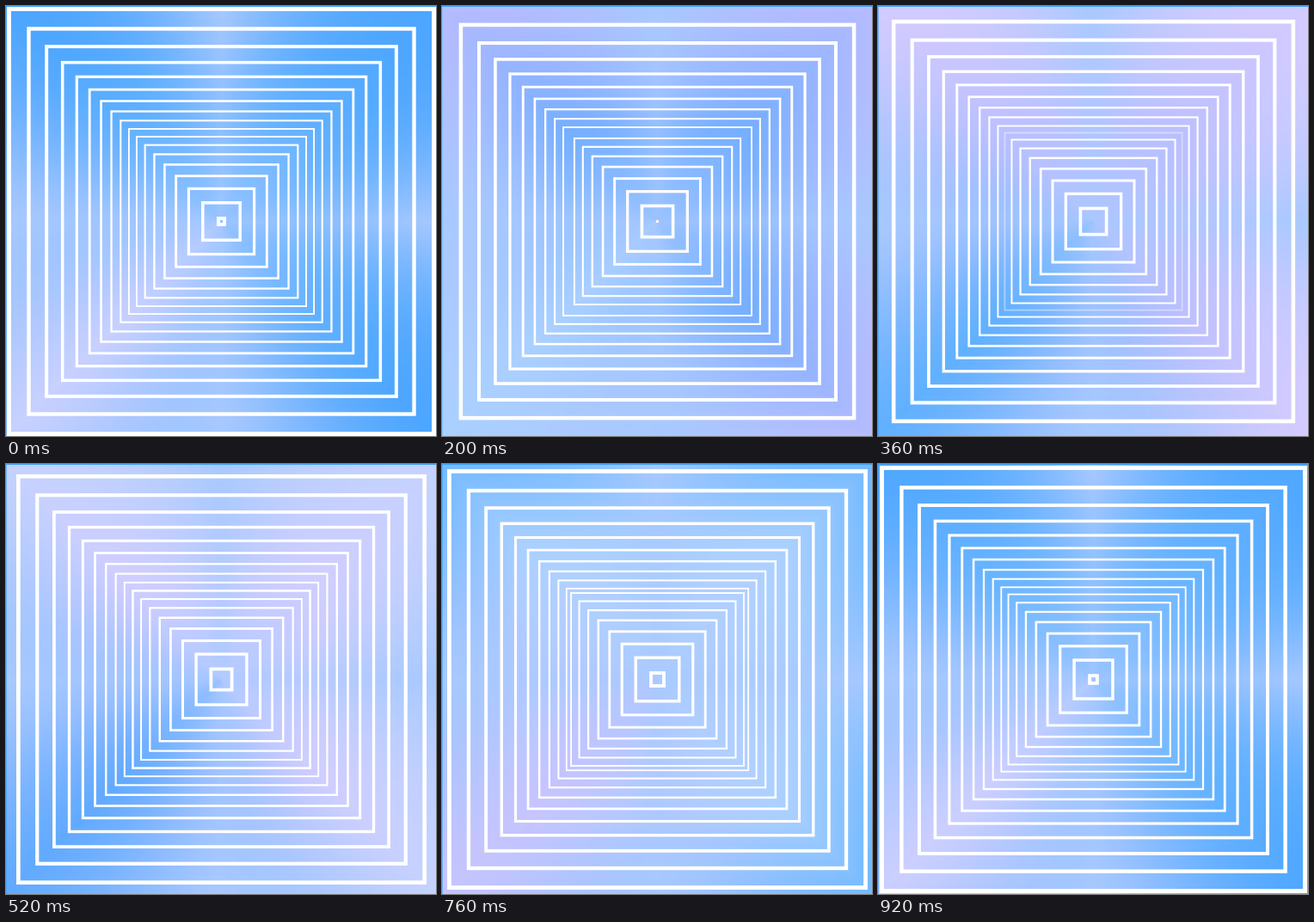
An HTML page with a canvas that plays this animation: 500 px wide and 500 px high, repeating every 960 ms.

```html
<!DOCTYPE html>
<html lang="en">
<head>
<meta charset="utf-8">
<title>Square tunnel</title>
<style>
html, body { margin: 0; width: 100%; height: 100%; overflow: hidden; }
canvas { display: block; width: 500px; height: 500px; }
</style>
</head>
<body>
<canvas id="stage" width="500" height="500"></canvas>
<script>
const LOOP = 960, STEP = 40, CENTER = 250.5, GRID = 100;
const MEAN = [168, 201];
// Corner colour cycle: time, red, green (blue stays at 255)
const CYCLE = [
  [0, 77, 166], [200, 183, 188], [360, 212, 204], [520, 196, 210],
  [680, 170, 208], [760, 116, 186], [920, 78, 167], [960, 77, 166]
];

const ctx = document.getElementById('stage').getContext('2d');
const field = document.createElement('canvas');
field.width = field.height = GRID;
const fieldCtx = field.getContext('2d');
const image = fieldCtx.createImageData(GRID, GRID);

const clamp = x => Math.max(0, Math.min(1, x));
const mix = (a, b, k) => a + (b - a) * k;

function cycleColor(time) {
  const t = ((time % LOOP) + LOOP) % LOOP;
  const i = CYCLE.findIndex(key => key[0] > t);
  const a = CYCLE[i - 1], b = CYCLE[i];
  const k = (t - a[0]) / (b[0] - a[0]);
  return [mix(a[1], b[1], k), mix(a[2], b[2], k)];
}

function drawField(t) {
  for (let y = 0, p = 0; y < GRID; y++) {
    for (let x = 0; x < GRID; x++, p += 4) {
      const dx = (x + 0.5) / GRID * 2 - 1, dy = (y + 0.5) / GRID * 2 - 1;
      const radius = Math.max(Math.abs(dx), Math.abs(dy));
      // The lower left corner runs half a cycle apart from the other three
      const angle = Math.acos((dy - dx) / Math.hypot(dx, dy) / Math.SQRT2);
      const opposite = clamp(1 - angle / (Math.PI / 2));
      const diagonal = Math.abs(2 * dx * dy) / (dx * dx + dy * dy);
      const lag = 130 * clamp((1 - radius) / 0.6);
      const main = cycleColor(t - lag), other = cycleColor(t + LOOP / 2);
      const flat = 0.4 * clamp((1 - radius) / 0.6);
      const strength = mix(diagonal, 1, flat) * mix(0.25, 1, clamp(radius / 0.45));
      for (let c = 0; c < 2; c++) {
        image.data[p + c] = mix(MEAN[c], mix(main[c], other[c], opposite), strength);
      }
      image.data[p + 2] = image.data[p + 3] = 255;
    }
  }
  fieldCtx.putImageData(image, 0, 0);
  ctx.drawImage(field, 0, 0, 500, 500);
}

function drawSquare(half, width) {
  if (half <= 0) return;
  const w = Math.min(width, half), r = half - w / 2;
  ctx.lineWidth = w;
  ctx.strokeRect(CENTER - r, CENTER - r, 2 * r, 2 * r);
}

function drawSquares(t) {
  ctx.strokeStyle = '#fff';
  for (let n = 0; n <= 10; n++) {
    const age = n + t / LOOP - 0.5;
    ctx.globalAlpha = clamp((age + 0.17) / 0.2);
    const u = Math.max(0, age);
    const grow = 1.115 ** u, shrink = 1.11 ** u;
    drawSquare(23.75 + 80.26 * grow, 1.75 * grow);
    drawSquare(186.85 - 82.9 * shrink, 1.8 * shrink);
  }
  ctx.globalAlpha = 1;
}

function frame() {
  const t = Math.floor(performance.now() % LOOP / STEP) * STEP;
  drawField(t);
  drawSquares(t);
  ctx.fillStyle = '#3fa2ff';
  ctx.fillRect(0, 0, 500, 1);
  ctx.globalAlpha = 0.6;
  ctx.fillRect(0, 1, 1, 499);
  ctx.globalAlpha = 1;
  requestAnimationFrame(frame);
}
frame();
</script>
</body>
</html>
```
